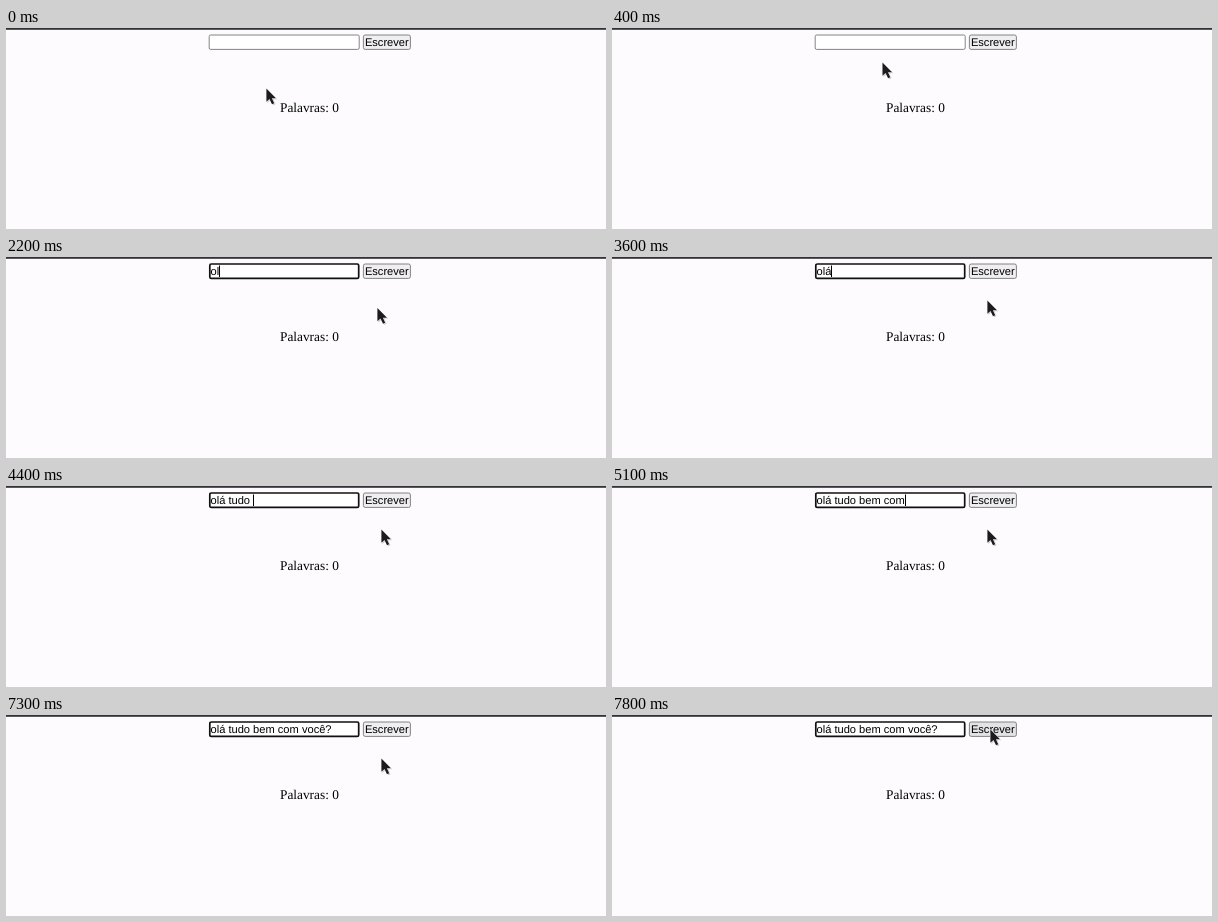
Recreate the animation shown at these times as an HTML page. Size 600x201 px, loop 8 s.

```html
<!DOCTYPE html>
<html lang="pt">
<head>
<meta charset="utf-8">
<title>Contador de palavras</title>
<style>
  html, body { margin: 0; width: 100%; height: 100%; overflow: hidden; background: #fdfbfd; }
  svg { display: block; width: 600px; height: 201px; }
  text { white-space: pre; text-rendering: geometricPrecision; }
  .ui { font: 11.11px "Liberation Sans", Arial, sans-serif; }
  .label { font: 13.33px "Liberation Serif", "Times New Roman", serif; }
  #field { fill: #fff; stroke: #777; stroke-width: 0.9; }
  #field.focused { stroke: #101012; stroke-width: 1.7; x: 203.8px; width: 148.9px; }
  #button { fill: #efeef0; stroke: #777; stroke-width: 0.9; }
  #button.hover { fill: #e3e2e4; }
</style>
</head>
<body>
<svg viewBox="0 0 600 201">
  <rect width="600" height="1.8" fill="#343237"/>
  <rect id="field" x="203.2" y="7" width="150" height="14.4" rx="1.5"/>
  <text id="typed" class="ui" x="204.5" y="18"></text>
  <rect id="caret" y="8.5" width="1" height="11.5"/>
  <rect id="button" x="357.4" y="7" width="47" height="14.4" rx="1.8"/>
  <text class="ui" x="358.9" y="18">Escrever</text>
  <text class="label" x="274" y="83.6">Palavras: 0</text>
  <g id="arrow">
    <path d="M1.3 2V15L4.6 12.2 7.2 17.2 9.5 16.2 7.4 11.3H11.4Z" opacity="0.2"/>
    <path d="M.4 .5V13.8L3.5 11 6 16.2 8.2 15.2 5.9 10.3H10Z" fill="#1c1b1e" stroke="#fff" stroke-width="0.8" paint-order="stroke"/>
  </g>
  <g id="beam" fill="none">
    <path id="beamShape" d="M-2.5 -5.5H-1L0 -4.5 1 -5.5H2.5M0 -4.5V5M-2.5 6H-1L0 5 1 6H2.5"/>
    <use href="#beamShape" stroke="#fff" stroke-width="2.4"/>
    <use href="#beamShape" stroke="#222"/>
  </g>
</svg>
<script>
const LOOP = 8000, FOCUS = 750, BLINK = 600, TEXT_X = 204.5;
const DEAD_KEY = '^'; // waits for its vowel and hides the caret

const bursts = [
  { from: 1900, step: 200, keys: 'ol' },
  { from: 2400, step: 100, keys: 'á' },
  { from: 3900, step: 100, keys: ' tudo bem com ' },
  { from: 5900, step: 100, keys: 'voc' },
  { from: 6400, step: 130, keys: '^ê?' }
];
const strokes = bursts.flatMap(({ from, step, keys }) =>
  [...keys].map((key, i) => ({ key, time: from + i * step })));

const origin = { x: 260, y: 60 };
const moves = [
  { from: 50, to: 700, x: 278, y: 13.5 },
  { from: 950, to: 1400, x: 371, y: 50.5 },
  { from: 3120, to: 3200, x: 375, y: 43 },
  { from: 7520, to: 7780, x: 378, y: 14 }
];

const $ = id => document.getElementById(id);
const show = (id, visible) => $(id).setAttribute('visibility', visible ? 'visible' : 'hidden');
const smooth = p => p * p * (3 - 2 * p);

function pointerAt(t) {
  let { x, y } = origin;
  for (const move of moves) {
    const p = smooth(Math.min(1, Math.max(0, (t - move.from) / (move.to - move.from))));
    x += (move.x - x) * p;
    y += (move.y - y) * p;
  }
  return { x, y };
}

function drawTyping(t) {
  const pressed = strokes.filter(stroke => stroke.time <= t);
  const last = pressed[pressed.length - 1] || { time: FOCUS };
  $('typed').textContent = pressed.map(stroke => stroke.key).join('').replace(DEAD_KEY, '');
  $('caret').setAttribute('x', Math.round(TEXT_X + $('typed').getComputedTextLength()));
  const lit = Math.floor((t - last.time) / BLINK) % 2 === 0;
  show('caret', t >= FOCUS && lit && last.key !== DEAD_KEY && pressed.length > 0);
  $('field').classList.toggle('focused', t >= FOCUS);
}

function drawPointer(t) {
  const { x, y } = pointerAt(t);
  const inRow = y > 6 && y < 22;
  const overField = inRow && x > 203 && x < 354;
  $('button').classList.toggle('hover', inRow && x > 357 && x < 405);
  for (const id of ['arrow', 'beam']) $(id).setAttribute('transform', `translate(${x} ${y})`);
  show('beam', overField);
  show('arrow', !overField);
}

const start = performance.now();
function tick() {
  const t = (performance.now() - start) % LOOP;
  drawTyping(t);
  drawPointer(t);
  requestAnimationFrame(tick);
}
tick();
</script>
</body>
</html>
```
